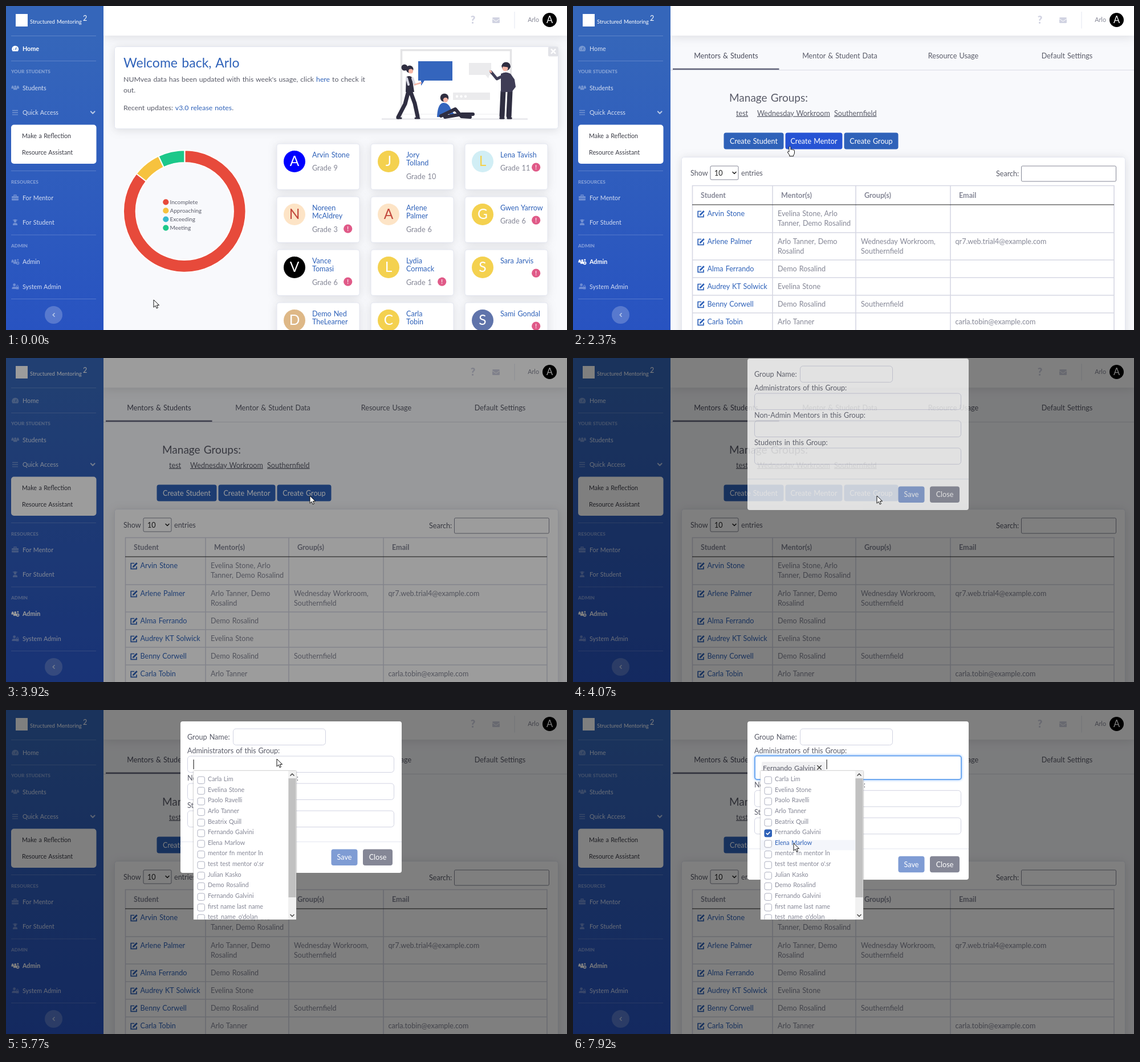
An HTML page that plays this animation: 984 px wide and 569 px high, repeating every 8000 ms.

```html
<!DOCTYPE html>
<html lang="en">
<head>
<meta charset="utf-8">
<title>Group administration demo</title>
<style>
html, body { margin: 0; width: 100%; height: 100%; overflow: hidden; background: #f8f9fc; }
svg { display: block; width: 984px; height: 569px; }
text { font-family: Lato, "Open Sans", sans-serif; word-spacing: .065em; white-space: pre; }
.card { fill: #fff; stroke: #e3e6f0; filter: drop-shadow(0 2px 8px rgba(58,59,69,.15)); }
.item text { fill: #fff; fill-opacity: .8; }
.item g { opacity: .32; }
.on text { fill-opacity: 1; }
.on g { opacity: 1; }
.active text { font-weight: 700; }
</style>
</head>
<body>
<svg id="stage" viewBox="0 0 984 569"></svg>
<script>
const BLUE = '#2f62b9', GREY = '#858796', DARK = '#5a5c69', LINE = '#d1d3e2', NAVY = '#2f2e41', SKIN = '#f5b5a5';
const BODY = 12.6, SMALL = 10.75, NOTE = 12.3;

const text = (x, y, s, fill = DARK, size = BODY, more = '') =>
  `<text x="${x}" y="${y}" fill="${fill}" font-size="${size}" ${more}>${s}</text>`;
const mid = (x, y, s, fill, size, more = '') => text(x, y, s, fill, size, `text-anchor="middle" ${more}`);
const rect = (x, y, w, h, fill, r = 0, more = '') =>
  `<rect x="${x}" y="${y}" width="${w}" height="${h}" fill="${fill}" rx="${r}" ${more}/>`;
const disc = (x, y, r, fill, more = '') => `<circle cx="${x}" cy="${y}" r="${r}" fill="${fill}" ${more}/>`;
const path = (d, fill, more = '') => `<path d="${d}" fill="${fill}" ${more}/>`;
const stroke = (d, color, w = 1, more = '') => path(d, 'none', `stroke="${color}" stroke-width="${w}" ${more}`);
const limb = (d, color, w) => stroke(d, color, w, 'stroke-linecap="round" stroke-linejoin="round"');
const group = (id, body, more = '') => `<g id="${id}" ${more}>${body}</g>`;
const field = (x, y, w, h) => rect(x, y, w, h, '#fff', 5, `stroke="${LINE}"`);

// ---- sidebar ----
const person = (x, y, k) => disc(x, y, 2.3 * k, '#fff') +
  path(`M${x - 4 * k} ${y + 7 * k}v-1q0-3 ${3 * k}-3h${2 * k}q${3 * k} 0 ${3 * k} 3v1z`, '#fff');
const pair = person(1.6, 3.6, .55) + person(6.2, 4, .82);
const icons = {
  gauge: path('M1.5 11a6 6 0 1 1 9.4 0z', '#fff') + stroke('M6.2 8.5L8.2 4.2M3 7.5h1M8.8 7.5h1', BLUE, 1.1),
  crowd: pair + person(10.8, 3.6, .55),
  bars: stroke('M1 2.5h10M1 6.2h10M1 9.9h10', '#fff', 1.4),
  bag: rect(0, 3.5, 12, 7.5, '#fff', 1) + stroke('M4 3.5v-2h4v2', '#fff', 1.3) + stroke('M0 7.3h12', BLUE, .9),
  pupil: person(6, 4, 1) + path('M1 2l5-1.6 5 1.6-5 1.6z', '#fff'),
  gear: pair + stroke('M8.6 8.4a2 2 0 1 0 4 0a2 2 0 1 0-4 0', '#fff', 1.6) + disc(10.8, 3, 1.4, '#fff'),
  lock: person(4.6, 3.2, 1.05) + rect(7.5, 6.5, 5, 4.5, '#fff', .8) + stroke('M8.6 6.6v-1.5a1.4 1.4 0 0 1 2.8 0v1.5', '#fff')
};
const items = [['Home', 74.5, 'gauge'], ['Students', 143.5, 'crowd'], ['Quick Access', 187, 'bars'], ['For Mentor', 336.5, 'bag'],
  ['For Student', 380, 'pupil'], ['Admin', 449, 'gear'], ['System Admin', 492.5, 'lock']];
const headings = [['YOUR STUDENTS', 118], ['RESOURCES', 312], ['ADMIN', 423.5]];

const sidebar = rect(0, 0, 171, 569, 'url(#blue)') + rect(17, 14, 21, 22, '#fff') +
  text(42, 30.5, 'Structured Mentoring', '#fff', 9.5) + text(135, 26, '2', '#fff', 12.5) +
  [52.5, 96.5, 289.5, 402, 514.5].map(y => stroke(`M9 ${y}H158`, '#fff', 1, 'opacity=".2"')).join('') +
  headings.map(([s, y]) => text(9, y, s, '#fff', 8.3, 'font-weight="800" opacity=".42"')).join('') +
  items.map(([s, y, icon]) => `<g class="item"><g transform="translate(10 ${y - 6})">${icons[icon]}</g>${text(29, y + 4, s, '#fff', SMALL)}</g>`).join('') +
  limb('M148.8 185.3l3.4 3.4 3.4-3.4', '#b9c9e6', 2) + rect(9, 208.5, 149.5, 68.5, '#fff', 5) +
  text(28, 232, 'Make a Reflection', '#3a3b45', SMALL) + text(28, 260.5, 'Resource Assistant', '#3a3b45', SMALL) +
  disc(83.5, 542.5, 15.5, '#fff', 'opacity=".22"') + limb('M85 539.7l-2.8 2.8 2.8 2.8', '#bccbe9', 1.6);

const topbar = rect(171, 0, 813, 52, '#fff', 0, 'style="filter:drop-shadow(0 2px 9px rgba(58,59,69,.15))"') +
  mid(819, 31, '?', LINE, 18, 'font-weight="900"') + rect(853, 20, 13, 10, LINE, 1.5) +
  stroke('M853 22.5l6.5 4.5 6.5-4.5', '#fff') + stroke('M892 10V39.5', '#e3e6f0') +
  text(935, 28, 'Arlo', GREY, SMALL, 'text-anchor="end"') + disc(953.5, 24.5, 12.5, '#000') + mid(953.5, 30.3, 'A', '#fff', 16.5);

// ---- dashboard ----
const scene = stroke('M659 198.5H915', '#d9d9e0', 1.3) + stroke('M693.5 198V77.5H885.5V198', '#e4e4e6', 3.5) + stroke('M693 190H885', '#ececee', 1) +
  path('M723 97h60v34h-49l-6 9v-9h-5z', '#3465bd') + path('M812 100h39v21h-3l-2 6-5-6h-29z', '#ebebed') +
  rect(784, 152, 65, 13, '#ebebed') + [791, 798.5, 806].map(x => disc(x, 158.7, 2.2, '#fff')).join('') +
  // standing on the left
  disc(699, 108, 5.5, NAVY) + disc(708, 111, 6.5, NAVY) + disc(710, 114.5, 4, SKIN) +
  limb('M706 149L700 172 688 195M709 149L717 171 722 194', NAVY, 7) +
  path('M702 125q5-4 10 0l4 26h-15z', NAVY) + limb('M703 127l3 11M713 127l4 11', '#d8d8e4', 4) + limb('M717 138l11-3', SKIN, 2.5) +
  limb('M686 197h7M718 197h7', NAVY, 3) +
  // seated
  disc(769, 161, 7.3, NAVY) + disc(771, 165, 4.2, SKIN) + path('M756 195q1-24 11-25 10 0 14 13l6 8-4 4-8-7v7z', '#3465bd') +
  limb('M763 193L788 181 799 194 814 195M770 195L800 190 819 190', NAVY, 6) +
  // standing on the right
  limb('M872 150L870 193M884 150L882 193', NAVY, 9) + limb('M867 197h6M880 197h6', NAVY, 3.5) +
  path('M868 119q9-5 17 0l7 10 2 13-7 9h-19z', '#3f3d56') + limb('M871 123L861 128 851 116', '#3f3d56', 5) + limb('M851 116l-2-2', SKIN, 3) +
  disc(877, 106, 7.5, NAVY) + disc(875.5, 109.5, 5, SKIN) + path('M869 106q2-8 10-7 6 1 6 9z', NAVY);

const ring = [[0, 308, '#e74a3b'], [308, 334.7, '#f6c23e'], [334.7, 360, '#1cc88a']].map(([a, b, color]) => {
  const p = (deg, r) => `${313.3 + r * Math.sin(deg * Math.PI / 180)} ${360.5 - r * Math.cos(deg * Math.PI / 180)}`;
  const big = +(b - a > 180);
  return path(`M${p(a, 107.3)}A107.3 107.3 0 ${big} 1 ${p(b, 107.3)}L${p(b, 85.6)}A85.6 85.6 0 ${big} 0 ${p(a, 85.6)}z`, color, 'stroke="#fff" stroke-width="2"');
}).join('');
const legend = [['Incomplete', '#e74a3b'], ['Approaching', '#f6c23e'], ['Exceeding', '#36b9cc'], ['Meeting', '#1cc88a']]
  .map(([s, color], i) => disc(280.3, 344.3 + 15.1 * i, 5.1, color) + text(287.5, 348 + 15.1 * i, s, DARK, 10)).join('');

const SUN = '#f4d14f', PEACH = '#fde4c6', RUST = '#c2473c';
// first line, second line, grade, alert, avatar colour, letter colour
const pupils = [
  ['Arvin Stone', '', 9, 0, '#0000ff'], ['Jory', 'Tolland', 10, 0, SUN], ['Lena Tavish', '', 11, 1, '#d1eef5', SUN],
  ['Noreen', 'McAldrey', 3, 1, PEACH, RUST], ['Arlene', 'Palmer', 6, 0, PEACH, RUST], ['Gwen Yarrow', '', 6, 1, SUN],
  ['Vance', 'Tomasi', 6, 1, '#000'], ['Lydia', 'Cormack', 1, 1, SUN], ['Sara Jarvis', '', 0, 1, SUN],
  ['Demo Ned', 'TheLearner', 0, 0, '#deb887'], ['Carla', 'Tobin', 0, 0, SUN], ['Sami Gondal', '', 0, 1, '#6074ab']
];
const cards = pupils.map(([a, b, grade, alert, color, ink = '#fff'], i) => {
  const x = 475 + i % 3 * 165, y = 242 + 93 * Math.floor(i / 3), low = b ? 15 : 0;
  return rect(x, y, 145, 80.5, '', 4, 'class="card"') + disc(x + 31, y + 31, 19, color) + mid(x + 31, y + 39.3, a[0], ink, 24.5) +
    text(x + 62, y + 23.7, a, BLUE) + text(x + 62, y + 38.3, b, BLUE) +
    (grade ? text(x + 62, y + 47 + low, 'Grade ' + grade, GREY) : '') +
    (alert ? disc(x + 124.7, y + 41.2 + low, 7.6, '#e05a88') + mid(x + 124.7, y + 45.4 + low, '!', '#fff', 12) : '');
}).join('');

const home = rect(190.5, 71.5, 778, 144, '', 4, 'class="card"') +
  text(206, 107.5, 'Welcome back, Arlo', BLUE, 23) +
  text(206, 133, `NUMvea data has been updated with this week's usage, click <tspan fill="${BLUE}">here</tspan> to check it`, DARK, NOTE) +
  text(206, 151.5, 'out.', DARK, NOTE) + text(206, 182.5, `Recent updates: <tspan fill="${BLUE}">v3.0 release notes</tspan>.`, DARK, NOTE) +
  rect(951, 71.5, 17.5, 17, '#e2e3e8', 2) + stroke('M956 75.7l8 8m0-8l-8 8', '#fff', 2.4) +
  scene + ring + legend + cards;

// ---- admin page ----
const buttons = [[264.5, 105, 'Create Student'], [372.5, 100, 'Create Mentor'], [475.5, 95, 'Create Group']];
const rows = [
  [349, 'Arvin Stone', 'Evelina Stone, Arlo|Tanner, Demo Rosalind', '', ''],
  [398, 'Arlene Palmer', 'Arlo Tanner, Demo|Rosalind', 'Wednesday Workroom,|Southernfield', 'qr7.web.trial4@example.com'],
  [446, 'Alma Ferrando', 'Demo Rosalind', '', ''], [477, 'Audrey KT Solwick', 'Evelina Stone', '', ''],
  [508, 'Benny Corwell', 'Demo Rosalind', 'Southernfield', ''], [539, 'Carla Tobin', 'Arlo Tanner', '', 'carla.tobin@example.com']
];
const lines = (x, y, s) => s.split('|').map((part, i) => text(x, y + 17 * i, part, GREY)).join('');
const pencil = stroke('M11 7.5v4.3h-9.8v-9.8h6', BLUE, 1.7) + stroke('M5.2 8.2L11.8 1.6', BLUE, 2.8) + path('M3.8 9.6l.5-2.6 2.1 2.1z', BLUE);
const link = (x, s) => text(x, 192.5, s, DARK, BODY, 'text-decoration="underline"');

const admin = stroke('M171 112.5H984', '#d9dbe4') + rect(175, 109.5, 186.5, 2.5, '#65677d') +
  mid(268.5, 92, 'Mentors &amp; Students', '#4a4c5c') +
  [[468, 'Mentor &amp; Student Data'], [667, 'Resource Usage'], [866.5, 'Default Settings']].map(([x, s]) => mid(x, 92, s)).join('') +
  text(274, 168, 'Manage Groups:', DARK, 19) +
  link(286, 'test') + link(323, 'Wednesday Workroom') + link(458, 'Southernfield') +
  buttons.map(([x, w, s]) => rect(x, 222.5, w, 29, BLUE, 4, 'class="btn"') + mid(x + w / 2, 241.7, s, '#fff')).join('') +
  rect(190.5, 265.5, 778, 320, '', 4, 'class="card"') +
  text(206, 297.7, 'Show') + rect(241, 281, 49, 24, '#fff', 2, `stroke="${GREY}"`) + text(248, 298, '10', '#222') +
  limb('M280 291.5l3 3 3-3', '#222', 1.6) + text(295, 297.7, 'entries') +
  text(742, 299, 'Search:') + rect(786.5, 281, 166, 27, '#fff', 2, `stroke="${GREY}"`) +
  stroke('M209.5 590V315.5H949V590M350 315V590M496 315V590M662 315V590', '#d6d8e4', 1.6) +
  stroke(rows.slice(1).map(r => `M209 ${r[0]}H949`).join(''), '#d6d8e4', 1.6) + stroke('M209 349H949', '#222', 1.2) +
  [[224, 'Student'], [365, 'Mentor(s)'], [511, 'Group(s)'], [677, 'Email']].map(([x, s]) => text(x, 337, s, GREY, BODY, 'font-weight="700"')).join('') +
  rows.map(([y, name, mentors, groups, mail]) => `<g transform="translate(218 ${y + 9.5})">${pencil}</g>` +
    text(235.5, y + 20.3, name, BLUE) + lines(359, y + 20.3, mentors) + lines(505, y + 20.3, groups) + text(670.5, y + 20.3, mail, GREY)).join('');

// ---- dialog ----
const modal = rect(306, 20, 388, 266, '#fff', 4, 'id="sheet"') +
  text(318, 51.5, 'Group Name:') + field(398.5, 33, 162, 28.5) + text(318, 75.5, 'Administrators of this Group:') +
  group('box', field(318.5, 81, 362, 28.5)) +
  group('chip', rect(319, 80.5, 362, 41.5, '#fff', 4, 'stroke="#6ea8f0" stroke-width="2" style="filter:drop-shadow(0 0 2px #8fc0ff)"') +
    rect(331, 91, 111.5, 20, '#f0f0f2', 2) + text(333, 106, 'Fernando Galvini', DARK, NOTE) + stroke('M428.3 97.3l7.4 7.4m0-7.4l-7.4 7.4', '#444', 1.6)) +
  group('lower', text(318, 123.7, 'Non-Admin Mentors in this Group:') + field(318.5, 129, 362, 28.5) +
    text(318, 171.7, 'Students in this Group:') + field(318.5, 177, 362, 28.5) + stroke('M306 231.5H694', '#e3e6f0') +
    rect(570.5, 244.5, 46, 28.5, '#7f9cd4', 4) + mid(593.5, 263.3, 'Save', '#fff') +
    rect(626, 244.5, 52, 28.5, GREY, 4) + mid(652, 263.3, 'Close', '#fff')) +
  rect(0, 87, 1.2, 17, '#333', 0, 'id="caret"');

const mentors = ['Carla Lim', 'Evelina Stone', 'Paolo Ravelli', 'Arlo Tanner', 'Beatrix Quill', 'Fernando Galvini', 'Elena Marlow', 'mentor fn mentor ln',
  "test test mentor o'.sr", 'Julian Kasko', 'Demo Rosalind', 'Fernando Galvini', 'first name last name', "test_name_o'dolan"];
const STEP = 18.63;
const list = rect(329, 107, 180, 261, '#fff', 0, 'style="filter:drop-shadow(0 0 1px #888)"') +
  '<g clip-path="url(#listClip)">' + mentors.map((s, i) => {
    const y = 121 + STEP * i;
    return rect(329, y - 4.5, 166, 18, 'none', 0, 'class="row"') + rect(336, y - 4, 12.5, 12.5, '#fff', 3, 'stroke="#adb0c0"') +
      text(354, y + 4, s, GREY, SMALL, 'class="option"');
  }).join('') + group('tick', rect(335.5, 121 + STEP * 5 - 4.5, 13.5, 13.5, BLUE, 3) + limb(`M339.3 ${123.5 + STEP * 5}l2 2 3.8-4.2`, '#fff', 1.7)) + '</g>' +
  rect(495, 107, 14, 261, '#f1f1f1') + rect(495.5, 120, 13, 209, '#c1c1c1') +
  limb('M499 115l3-3 3 3M499 359.5l3 3 3-3', '#505050', 1.7);

const outline = 'stroke="#111" stroke-linejoin="round"';
const arrow = path('M0 0V13.2L3.1 10.3 5.2 15 7.4 14 5.4 9.4H9.6z', '#fff', outline);
const hand = path('M-1.5 10V1.3Q0-.9 1.5 1.3V6Q3 4.7 3.8 6.2 5.3 5 6 6.7 8 6 8 8.3V12Q8 14 6.3 15.5V17.5H-.7V15.5L-4.2 10.6Q-3.6 8.2-1.5 10z', '#fff', outline);

stage.innerHTML = `<defs><linearGradient id="blue" x2="0" y2="1"><stop offset=".1" stop-color="#3566ba"/><stop offset="1" stop-color="#2853c1"/></linearGradient>
  <clipPath id="listClip">${rect(329, 107, 166, 260.5, '#fff')}</clipPath></defs>` +
  rect(0, 0, 984, 569, '#f8f9fc') + topbar + group('home', home) + group('admin', admin) + sidebar +
  rect(0, 0, 984, 569, '#000', 0, 'id="shade"') + group('modal', modal) + group('list', list) +
  group('cursor', group('arrow', arrow) + group('hand', hand));

// ---- motion ----
const $ = id => document.getElementById(id);
const all = s => [...document.querySelectorAll(s)];
const show = (id, on) => $(id).style.display = on ? '' : 'none';
const clamp = v => Math.max(0, Math.min(1, v));
const nav = all('.item'), btns = all('.btn'), bands = all('.row'), options = all('.option');

const PAGE = 1390, SHADE = 3805, OPEN = 3955, FOCUS = 5350, DROP = 5400, PICK = 7400;
const track = [[0, 259, 516], [30, 259, 516], [830, 65, 450], [1440, 65, 450], [1650, 180, 354], [2490, 392, 240], [2890, 522, 242],
  [3060, 522, 242], [3250, 533, 242], [4500, 533, 242], [4760, 474, 50], [4950, 475, 86], [5850, 475, 86], [6150, 453, 88],
  [6970, 400, 171], [7300, 392, 211], [7550, 392, 211], [7920, 387, 234], [8000, 387, 234]];

function pointer(t) {
  const i = Math.max(1, track.findIndex(k => k[0] > t));
  const [t0, x0, y0] = track[i - 1], [t1, x1, y1] = track[i];
  const p = clamp((t - t0) / (t1 - t0)), e = p * p * (3 - 2 * p);
  return [x0 + (x1 - x0) * e, y0 + (y1 - y0) * e];
}

function draw(t) {
  const [x, y] = pointer(t), onAdmin = t >= PAGE, picked = t >= PICK, free = t < SHADE;
  let pointing = false;

  show('home', !onAdmin);
  show('admin', onAdmin);
  items.forEach(([name, cy], i) => {
    const over = free && x < 165 && Math.abs(y - cy) < 20, active = name === (onAdmin ? 'Admin' : 'Home');
    pointing ||= over;
    nav[i].setAttribute('class', 'item' + (over || active ? ' on' : '') + (active ? ' active' : ''));
  });
  buttons.forEach(([bx, w], i) => {
    const over = x >= bx && x < bx + w && y > 222 && y < 252 && onAdmin && t < SHADE + 60;
    pointing ||= over && free;
    btns[i].setAttribute('fill', over ? '#2653d4' : BLUE);
  });

  $('shade').setAttribute('opacity', .5 * clamp((t - SHADE) / 150));
  const lift = (1 - clamp((t - OPEN) / 300)) ** 1.43;
  show('modal', t >= OPEN);
  $('modal').setAttribute('opacity', clamp((t - OPEN) / 150));
  $('modal').setAttribute('transform', `translate(0 ${-38 * lift})`);
  $('sheet').setAttribute('height', picked ? 278 : 266);
  $('lower').setAttribute('transform', `translate(0 ${picked ? 12.3 : 0})`);
  show('box', !picked);
  show('chip', picked);
  show('caret', t >= FOCUS && (t - (picked ? PICK : FOCUS)) % 1000 < 550);
  $('caret').setAttribute('x', picked ? 444.5 : 328.5);

  show('list', t >= DROP);
  show('tick', picked);
  const row = y > 112 && x < 495 ? Math.round((y - 125.5) / STEP) : -1;
  options.forEach((o, i) => {
    o.setAttribute('fill', i === row ? BLUE : GREY);
    bands[i].setAttribute('fill', i === row ? '#f4f6fb' : 'none');
  });

  $('cursor').setAttribute('transform', `translate(${x} ${y})`);
  show('hand', pointing);
  show('arrow', !pointing);
}

const start = performance.now();
function tick() {
  draw((performance.now() - start) % 8000);
  requestAnimationFrame(tick);
}
tick();
</script>
</body>
</html>
```
